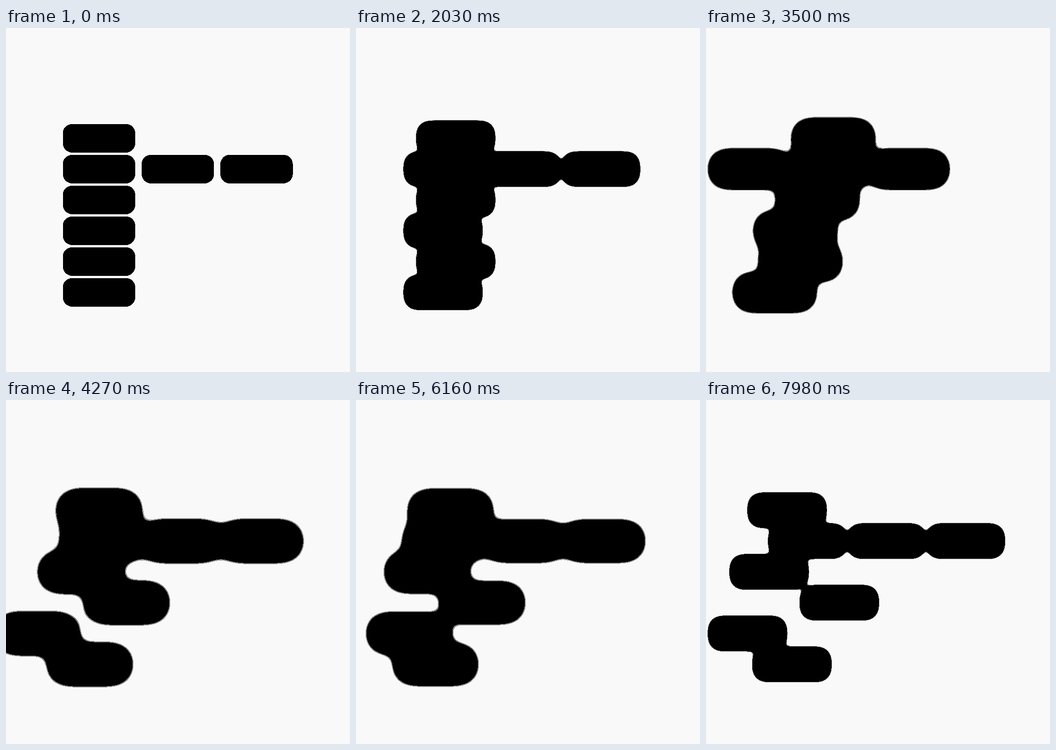
These frames come from a looping animation (748x748 px, 8 s). An HTML page with a canvas:

```html
<!DOCTYPE html>
<html lang="en">
<head>
<meta charset="utf-8">
<title>Gooey bars</title>
<style>
  html, body { margin: 0; width: 100%; height: 100%; overflow: hidden; background: #f9f9f9; }
  canvas { display: block; width: 100vw; height: 100vh; }
</style>
</head>
<body>
<canvas id="stage" width="748" height="748"></canvas>
<script>
const SIZE = 748, LOOP = 8000, STEP = 70;
const BAR = { x: 123.9, y: 209, w: 156.8, h: 61.5, r: 20, dx: 171.3, dy: 67 };
const BARS_IN_ROW = [1, 3, 1, 1, 1, 1];

// Horizontal shift of each row
const aligned = [0, 0, 0, 0, 0, 0];
const rest = [-26, 19, -65, 87.5, -112, -15.5];
const drift = [0, 8, -40, 60, -135, -20];
const spread = [-20, 72, -80, 110, -125, 20];
const zigzag = [14.5, -13, 14.5, -13, 14.5, -13];
const cross = [74.5, -106.5, 40, -8, 3, -53];
const lean = [28, -61.5, 5, 16.5, -47, -7.5];
const near = [3, -9, -48, 72.5, -87, -29.5];

const keys = [
  [0, aligned], [400, drift], [700, rest], [930, rest], [1400, drift],
  [2030, zigzag], [2400, drift], [3000, rest], [3360, rest], [3500, cross],
  [3900, drift], [4650, drift], [5180, lean], [5390, rest], [6160, near],
  [6720, spread], [6800, spread], [7560, rest], [8000, rest]
];

// Blur rises to its peak, then falls at the same rate
const PEAK_TIME = 5075, BLUR_TIME = 4700, PEAK_BLUR = 24;
const EDGE = 0.155 * 255, CORE = 0.184 * 255;

const view = document.getElementById("stage").getContext("2d");
const buffer = document.createElement("canvas");
buffer.width = buffer.height = SIZE;
const ink = buffer.getContext("2d", { willReadFrequently: true });
const output = view.createImageData(SIZE, SIZE);
const pixels = new Uint32Array(output.data.buffer);

const smooth = p => p * p * (3 - 2 * p);

function shiftsAt(t) {
  const next = keys.findIndex(key => key[0] > t);
  const [t0, from] = keys[next - 1];
  const [t1, to] = keys[next];
  const p = smooth((t - t0) / (t1 - t0));
  return from.map((x, i) => x + (to[i] - x) * p);
}

function drawBars(t) {
  const blur = PEAK_BLUR * Math.max(0, 1 - Math.abs(t - PEAK_TIME) / BLUR_TIME);
  ink.clearRect(0, 0, SIZE, SIZE);
  ink.filter = blur > 0 ? `blur(${blur}px)` : "none";
  ink.beginPath();
  shiftsAt(t).forEach((shift, row) => {
    for (let col = 0; col < BARS_IN_ROW[row]; col++) {
      ink.roundRect(BAR.x + shift + col * BAR.dx, BAR.y + row * BAR.dy, BAR.w, BAR.h, BAR.r);
    }
  });
  ink.fill();
}

function shade(alpha) {
  if (alpha < EDGE) return 0xfff9f9f9;
  return alpha < CORE ? 0xff8a8a8a : 0xff000000;
}

function render(t) {
  drawBars(t);
  const data = ink.getImageData(0, 0, SIZE, SIZE).data;
  for (let i = 0; i < pixels.length; i++) pixels[i] = shade(data[i * 4 + 3]);
  view.putImageData(output, 0, 0);
}

let shown = -1;
const start = performance.now();
function tick() {
  const t = Math.floor(((performance.now() - start) % LOOP) / STEP) * STEP;
  if (t !== shown) render(shown = t);
  requestAnimationFrame(tick);
}
tick();
</script>
</body>
</html>
```
